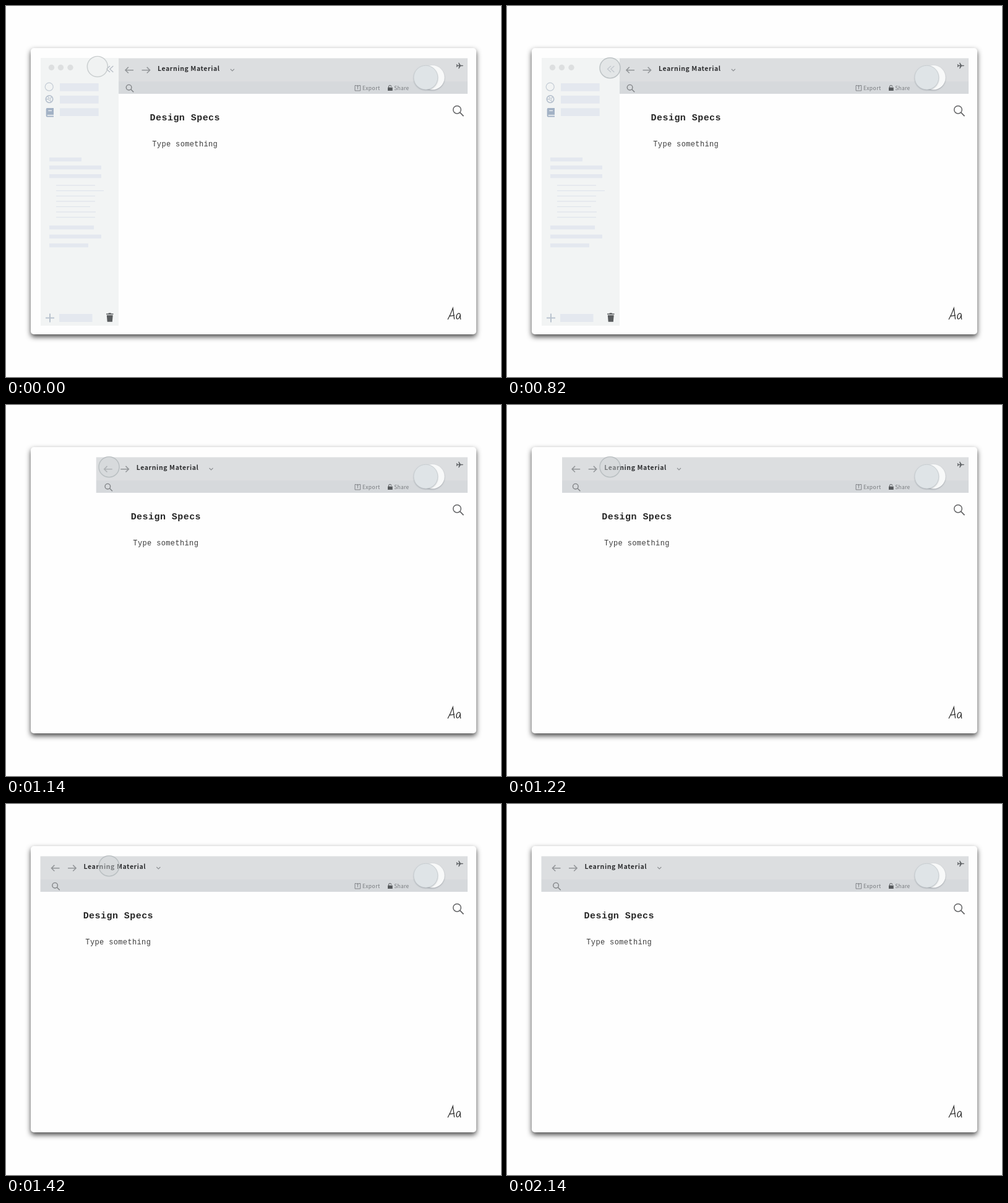
Write an HTML page with a canvas that moves like this. It is 800 px wide and 600 px high and loops after 3600 ms.

```html
<!DOCTYPE html>
<html lang="en">
<head>
<meta charset="utf-8">
<title>Collapsing sidebar</title>
<style>
html, body { margin: 0; width: 100%; height: 100%; overflow: hidden; background: #fefefe; }
canvas { display: block; width: 800px; height: 600px; }
</style>
</head>
<body>
<canvas id="stage" width="800" height="600"></canvas>
<script>
const ctx = document.getElementById('stage').getContext('2d');
const LOOP = 3600;
const SANS = '"Noto Sans CJK JP", "Noto Sans CJK SC", "Noto Sans", sans-serif';
const MONO = '"Liberation Mono", monospace';

const clamp = v => Math.min(1, Math.max(0, v));
const mix = (a, b, p) => a + (b - a) * p;

// cubic-bezier easing through (x1, y1) and (x2, y2)
function bezier(x1, y1, x2, y2) {
  const at = (a, b, s) => 3 * (1 - s) * (1 - s) * s * a + 3 * (1 - s) * s * s * b + s * s * s;
  return t => {
    t = clamp(t);
    let lo = 0, hi = 1;
    for (let i = 0; i < 30; i++) {
      const mid = (lo + hi) / 2;
      if (at(x1, x2, mid) < t) lo = mid; else hi = mid;
    }
    return at(y1, y2, (lo + hi) / 2);
  };
}
const easeInOut = bezier(0.42, 0, 0.58, 1);
const easeSlide = bezier(0.4, 0, 0.2, 1);

function rect(x, y, x2, y2, color) {
  ctx.fillStyle = color;
  ctx.fillRect(x, y, x2 - x, y2 - y);
}

function disc(x, y, r, color) {
  ctx.fillStyle = color;
  ctx.beginPath();
  ctx.arc(x, y, r, 0, Math.PI * 2);
  ctx.fill();
}

function ring(x, y, r, color, width) {
  ctx.strokeStyle = color;
  ctx.lineWidth = width;
  ctx.beginPath();
  ctx.arc(x, y, r, 0, Math.PI * 2);
  ctx.stroke();
}

function stroke(d, color, width) {
  ctx.strokeStyle = color;
  ctx.lineWidth = width;
  ctx.stroke(new Path2D(d));
}

function fill(d, color) {
  ctx.fillStyle = color;
  ctx.fill(new Path2D(d));
}

function text(str, x, y, font, color, spacing) {
  ctx.font = font;
  ctx.letterSpacing = spacing + 'px';
  ctx.fillStyle = color;
  ctx.fillText(str, x, y);
}

function shifted(dx, draw) {
  ctx.save();
  ctx.translate(dx, 0);
  draw();
  ctx.restore();
}

function card() {
  rect(0, 0, 800, 600, '#fefefe');
  ctx.save();
  ctx.shadowColor = 'rgba(0,0,0,0.72)';
  ctx.shadowBlur = 8;
  ctx.shadowOffsetY = 4;
  ctx.fillStyle = '#fefefe';
  ctx.beginPath();
  ctx.roundRect(40, 68, 720, 463, 5);
  ctx.fill();
  ctx.restore();
}

function sidebar() {
  const bar = '#e4e8ef', icon = '#b9c3cf';
  rect(56, 84, 182, 517, '#f2f4f4');
  for (const x of [73.5, 88.5, 104]) disc(x, 99.5, 4.7, '#dddfe0');
  stroke('M168 97l-5.5 5 5.5 5M173.3 97l-5.5 5 5.5 5', '#b4bac3', 1.2);

  ring(69.7, 130.7, 6.5, '#c4ccd5', 1.2);
  ring(70, 150.6, 5.7, icon, 1.8);
  ring(70, 150.6, 1.8, icon, 1);
  stroke('M64.5 150.6h3.7M71.5 149.4l3-3M71 152.4l2.2 3.4M69 148.8l-1.5-3', icon, 1.1);
  fill('M66.5 165h10.5v11h-10.3v1.5h10.3v2h-10.5q-1.8 0-1.8-2v-10.5q0-2 1.8-2z', '#a3b2c5');
  rect(68.3, 168.6, 74, 170, '#e9edf2');
  for (const y of [125, 145, 165.3]) rect(87, y, 149.7, y + 12.7, bar);

  const blocks = [[245, 122], [258, 154], [272, 154], [355, 142], [369.6, 154], [384, 133]];
  for (const [y, x2] of blocks) rect(70, y, x2, y + 6.4, bar);
  [144, 158, 144, 144, 136, 145, 144].forEach((x2, i) => {
    const y = 289.5 + i * 8.6;
    rect(81, y, x2, y + 1.2, '#dfe4eb');
  });

  stroke('M64 504.6h14M71 497.6v14', icon, 2);
  rect(86, 498, 139.5, 511, bar);
  fill('M162 497.5h3.7v-1h4v1h3.8v1.6h-11.5z', '#595c5e');
  fill('M162.8 500h9.9l-.9 10.8h-8.1z', '#595c5e');
}

function header(p) {
  const left = mix(182, 55.5, p);
  rect(left, 84.5, 746, 122, '#dcdee0');
  rect(left, 122, 746, 142, '#d6d9dc');
  shifted(-119.5 * p, () => {
    stroke('M206 103.7h-13M197.8 98.9l-4.9 4.8 4.9 4.8', '#929598', 1.5);
    stroke('M219.5 103.7h13M227.7 98.9l4.9 4.8-4.9 4.8', '#929598', 1.5);
    text('Learning Material', 245, 104.6, 'bold 10.5px ' + SANS, '#2c2d2f', 0.6);
    stroke('M362.8 102l3 3 3-3', '#8d9093', 1.1);
    ring(198.6, 131.7, 4.3, '#818487', 1.4);
    stroke('M201.7 134.8l4.5 4.4', '#818487', 1.5);
  });
}

function tools() {
  const gray = '#777a7e';
  stroke('M566.5 128.5h-2.5v8.5h8.7v-8.5h-2.5M568.4 134.5v-6.5M566.5 130l1.9-2 1.9 2', gray, 0.9);
  text('Export', 576, 136, '500 8.5px ' + SANS, gray, 0.45);
  rect(617, 131.7, 624.7, 137, '#56595c');
  stroke('M618.4 132v-1.6q0-2 2.2-2t2.2 2', '#56595c', 1);
  text('Share', 627.3, 136, '500 8.5px ' + SANS, gray, 0.25);

  ctx.save();
  ctx.shadowColor = 'rgba(60,70,80,0.35)';
  ctx.shadowBlur = 2;
  ctx.shadowOffsetY = 1;
  disc(689, 115.7, 19.7, '#f8f9f9');
  disc(678.4, 115.7, 19.6, '#dfe4e7');
  ctx.restore();
  ring(678.4, 115.7, 19.4, '#c5cbce', 0.8);

  fill('M739 96.5q0-.8-1.5-.8h-2.6l-2.7-4h-1.2l1.3 4h-2.4l-1-1.4h-1.2l.6 2.2-.6 2.2h1.2l1-1.4h2.4l-1.3 4h1.2l2.7-4h2.6q1.5 0 1.5-.8z', '#626568');
  ring(729, 167.7, 6.3, '#626365', 1.5);
  stroke('M733.6 172.2l5.9 6', '#626365', 1.7);

  stroke('M714 507q5-9 8.2-18.4q1.2 9 2.4 18M716.4 501.6l8.4-1.2', '#2d2d2d', 1.25);
  stroke('M734 498.2q-2.6-2.6-5 .8q-2 3.7-.6 6.5q2 1.8 4.1-1.5q1.6-3 1.8-5.6q-.5 5 .5 8.6', '#2d2d2d', 1.25);
}

function page(p) {
  shifted(-108 * p, () => {
    text('Design Specs', 232.6, 185, 'bold 15px ' + MONO, '#262626', 0.45);
    text('Type something', 236.3, 227, '12px ' + MONO, '#3c3c3c', 0.36);
  });
}

function pointer(t) {
  const p = easeInOut((t + 15) / 495);
  const x = mix(147.8, 166.5, p), y = mix(98, 100.2, p);
  ctx.globalAlpha = 1 - clamp((t - 2000) / 140);
  disc(x, y, 16.8, t < 820 ? 'rgba(238,240,239,0.45)' : 'rgba(208,214,215,0.45)');
  ring(x, y, 16.5, t < 820 ? 'rgba(190,195,196,0.75)' : 'rgba(176,183,186,0.75)', 1.5);
  ctx.globalAlpha = 1;
}

function draw(t) {
  const p = easeSlide((t - 1033) / 400);
  card();
  if (t < 1060) sidebar();
  header(p);
  tools();
  page(p);
  pointer(t);
}

const start = performance.now();
function tick() {
  draw((performance.now() - start) % LOOP);
  requestAnimationFrame(tick);
}
draw(0);
requestAnimationFrame(tick);
</script>
</body>
</html>
```
